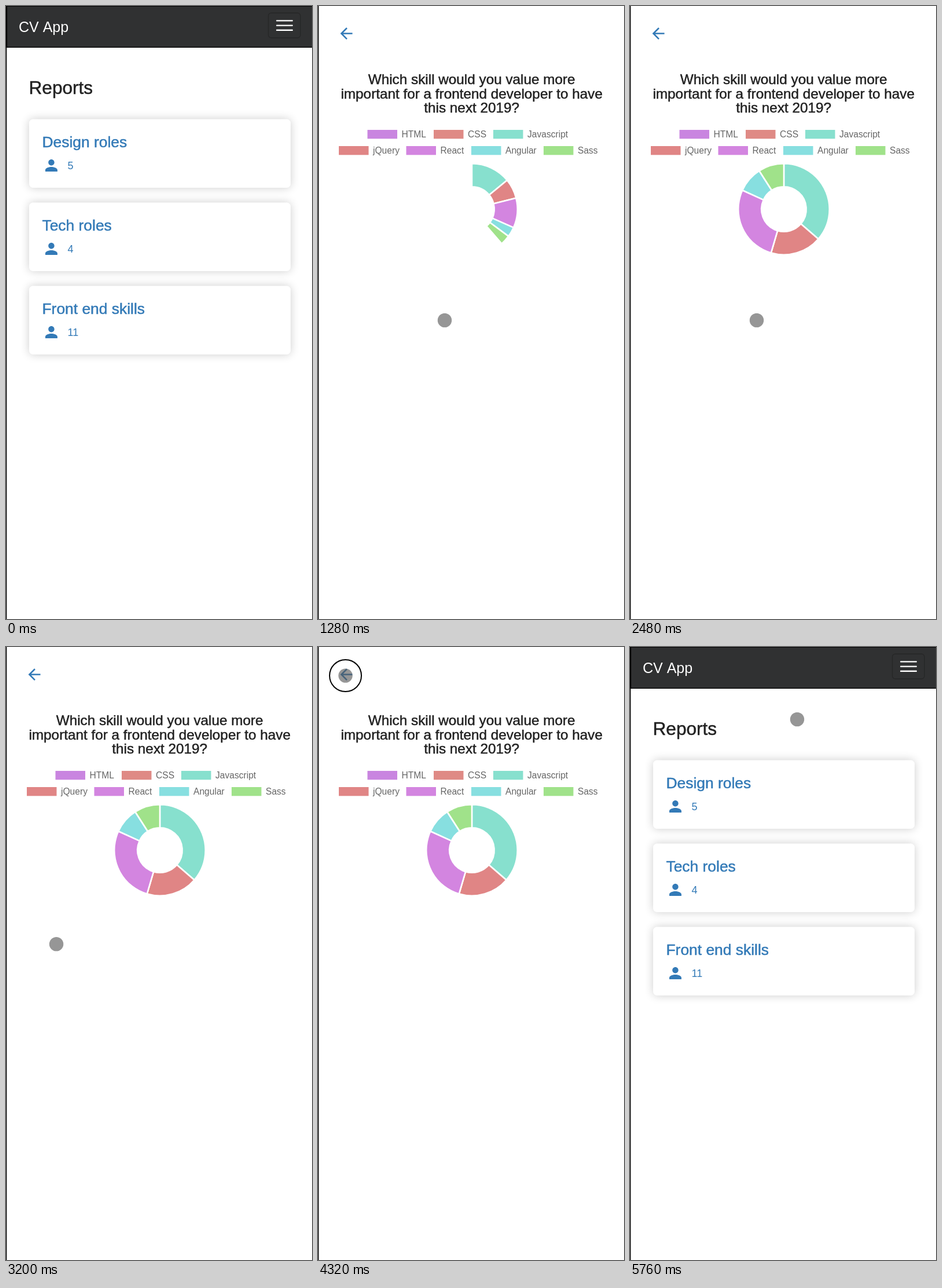
An HTML page with a canvas that plays this animation: 529 by 1059 pixels, repeating every 6080 ms.

```html
<!DOCTYPE html>
<html lang="en">
<head>
<meta charset="utf-8">
<title>Reports</title>
<style>
html, body { margin: 0; width: 100%; height: 100%; overflow: hidden; background: #fff; }
canvas { display: block; }
</style>
</head>
<body>
<canvas id="stage" width="529" height="1059"></canvas>
<script>
const c = document.getElementById('stage').getContext('2d');
const LOOP = 6080, STEP = 80, TAU = Math.PI * 2;
const BLUE = '#337ab7', ICON = 1.31;
const CHART_OPEN = 1165, CHART_CLOSE = 4360;

const person = new Path2D('M12 12c2.21 0 4-1.79 4-4s-1.79-4-4-4-4 1.79-4 4 1.79 4 4 4zm0 2c-2.67 0-8 1.34-8 4v2h16v-2c0-2.66-5.33-4-8-4z');
const arrow = new Path2D('M20 11H7.83l5.59-5.59L12 4l-8 8 8 8 1.41-1.41L7.83 13H20v-2z');

const cards = [['Design roles', 5], ['Tech roles', 4], ['Front end skills', 11]];

// label, colour, votes, legend x, legend y
const skills = [
  ['HTML', '#c985e0', 0, 85.5, 214],
  ['CSS', '#df8a85', 0, 200, 214],
  ['Javascript', '#87e0ce', 4, 303, 214],
  ['jQuery', '#e08585', 2, 36, 242],
  ['React', '#d385e0', 3, 152.5, 242],
  ['Angular', '#87dfe0', 1, 265, 242],
  ['Sass', '#a0e28a', 1, 390, 242]
];
const votes = skills.reduce((sum, s) => sum + s[2], 0);

// pointer stops: time, x, y
const stops = [
  [240, 540, 432], [800, 219, 543], [2640, 219, 543], [3360, 68, 509],
  [3920, 56, 79], [4080, 47.5, 49.5], [4720, 47.5, 49.5], [5280, 289, 125], [LOOP, 289, 125]
];
const presses = [[960, 1120], [4160, 4320]];

const smooth = u => u * u * (3 - 2 * u);
const easeOutQuart = u => 1 - (1 - u) ** 4;

function text(str, x, y, size, color, weight = 0, align = 'left') {
  c.font = `${size}px "Liberation Sans", Arial, sans-serif`;
  c.textAlign = align;
  c.fillStyle = c.strokeStyle = color;
  c.fillText(str, x, y);
  if (weight) {
    c.lineWidth = weight;
    c.strokeText(str, x, y);
  }
}

function box(x, y, w, h, r) {
  c.beginPath();
  c.roundRect(x, y, w, h, r);
}

function disc(x, y, r) {
  c.beginPath();
  c.arc(x, y, r, 0, TAU);
}

function icon(path, x, y) {
  c.save();
  c.translate(x, y);
  c.scale(ICON, ICON);
  c.fillStyle = BLUE;
  c.fill(path);
  c.restore();
}

function navbar() {
  c.fillStyle = '#000';
  c.fillRect(0, 0, 529, 72);
  c.fillStyle = '#303132';
  c.fillRect(2, 1, 527, 69.7);
  text('CV App', 22, 45, 25, '#fff');
  box(453.5, 12, 55.5, 43, 5);
  c.strokeStyle = '#262727';
  c.lineWidth = 1.3;
  c.stroke();
  c.fillStyle = '#fff';
  for (let i = 0; i < 3; i++) {
    box(467, 24.2 + i * 8.2, 29, 2.4, 1);
    c.fill();
  }
}

function reports() {
  navbar();
  text('Reports', 39.5, 152, 31.6, '#222', 0.5);
  cards.forEach(([title, count], i) => {
    const y = 195.5 + i * 144;
    c.save();
    c.shadowColor = 'rgba(0,0,0,.2)';
    c.shadowBlur = 16;
    c.fillStyle = '#fff';
    box(40, y, 452, 118.5, 6.5);
    c.fill();
    c.restore();
    text(title, 62.5, y + 48, 26.4, BLUE, 0.5);
    icon(person, 62.7, y + 64.2);
    text(count, 106.5, y + 86.5, 18, BLUE);
  });
}

function doughnut(cx, cy, sweep) {
  let angle = -TAU / 4;
  c.strokeStyle = '#fff';
  c.lineWidth = 2.6;
  c.lineJoin = 'bevel';
  for (const [, color, n] of skills) {
    const end = angle + TAU * n / votes * sweep;
    c.beginPath();
    c.arc(cx, cy, 78.8, angle, end);
    c.arc(cx, cy, 38.7, end, angle, true);
    c.closePath();
    c.fillStyle = color;
    c.fill();
    c.stroke();
    angle = end;
  }
}

function chart(age) {
  icon(arrow, 33.3, 31.8);
  ['Which skill would you value more', 'important for a frontend developer to have', 'this next 2019?']
    .forEach((line, i) => text(line, 265.7, 135.3 + i * 24.5, 24.3, '#222', 0.5, 'center'));
  for (const [label, color, , x, y] of skills) {
    c.fillStyle = color;
    c.fillRect(x, y, 51.5, 15.3);
    text(label, x + 59, y + 13.2, 15.6, '#666');
  }
  doughnut(266, 351, easeOutQuart(Math.min(age / 1000, 1)));
}

function pointer(t) {
  const i = stops.findIndex(s => s[0] > t);
  if (i < 1) return;
  const [t0, x0, y0] = stops[i - 1], [t1, x1, y1] = stops[i];
  const u = smooth((t - t0) / (t1 - t0));
  const x = x0 + (x1 - x0) * u, y = y0 + (y1 - y0) * u;

  if (presses.some(([from, to]) => t >= from && t <= to)) {
    disc(x, y, 27.5);
    c.fillStyle = 'rgba(255,255,255,.35)';
    c.fill();
    c.strokeStyle = '#000';
    c.lineWidth = 2;
    c.stroke();
  }
  disc(x, y, 12.3);
  c.fillStyle = 'rgba(0,0,0,.41)';
  c.fill();
  disc(x, y, 13.5);
  c.strokeStyle = 'rgba(255,255,255,.45)';
  c.lineWidth = 2.4;
  c.stroke();
}

function draw(t) {
  c.fillStyle = '#fff';
  c.fillRect(0, 0, 529, 1059);
  if (t >= CHART_OPEN && t < CHART_CLOSE) chart(t - CHART_OPEN);
  else reports();
  c.fillStyle = '#000';
  c.fillRect(0, 0, 1.3, 1059);
  pointer(t);
}

const start = performance.now();
function tick() {
  const t = (performance.now() - start) % LOOP;
  draw(Math.floor(t / STEP) * STEP);
  requestAnimationFrame(tick);
}
tick();
</script>
</body>
</html>
```
